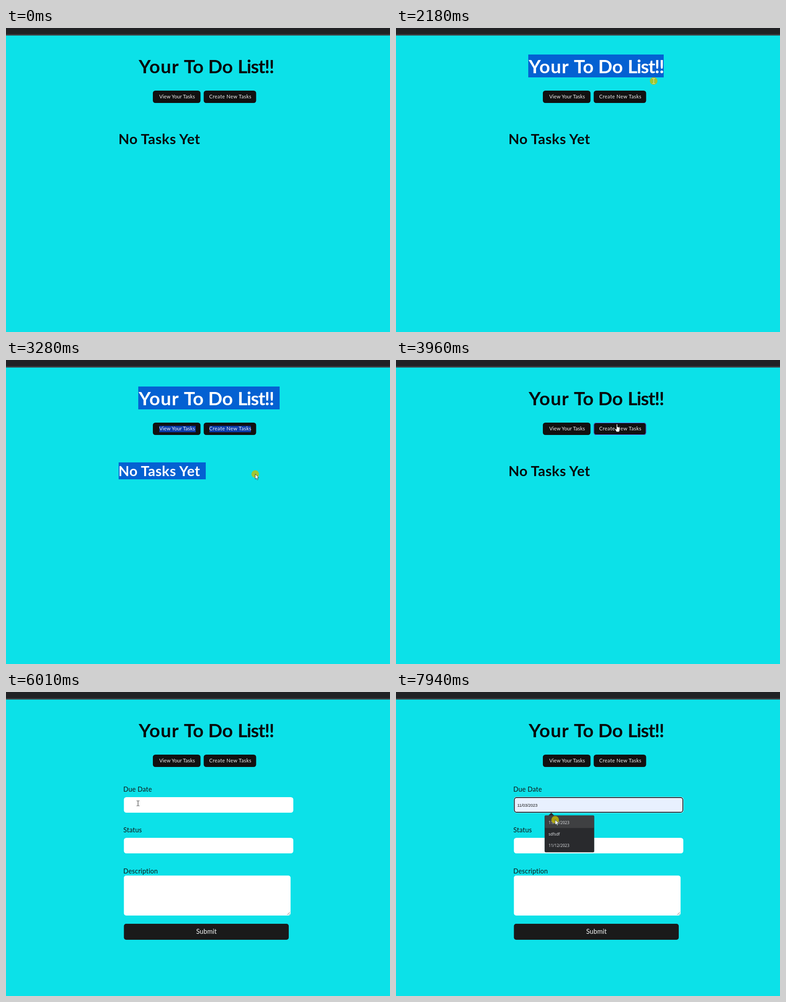
Recreate the animation shown at these times as an HTML page. Size 842x665 px, loop 8 s.

```html
<!DOCTYPE html>
<html lang="en">
<head>
<meta charset="utf-8">
<title>To do list</title>
<style>
  html, body { margin: 0; width: 100%; height: 100%; overflow: hidden; background: #0ce1e8; }
  svg { display: block; }
  text { font-family: Lato, "Open Sans", sans-serif; }
  .ui { font-family: "Open Sans", "Noto Sans", sans-serif; }
  .field { font-family: "Liberation Sans", Arial, sans-serif; }
</style>
</head>
<body>
<svg id="stage" width="842" height="665" viewBox="0 0 842 665"></svg>
<script>
const LOOP = 8000, STEP = 70;
const INK = '#080a0b', BLUE = '#0461d2', WHITE = '#fff';

// Areas that react to the pointer: x, y, width, height
const VIEW = [322, 137, 104.5, 27], NEW = [433.5, 137, 115, 27];
const FIELD = [258.5, 230, 371.5, 34], ROW = [326.5, 270, 107.5, 27.5];
const TITLE = [290, 58, 310, 60];

const text = (s, x, y, size, fill, more = '') =>
  `<text x="${x}" y="${y}" font-size="${size}" fill="${fill}" ${more}>${s}</text>`;
const box = ([x, y, w, h], r, fill, more = '') =>
  `<rect x="${x}" y="${y}" width="${w}" height="${h}" rx="${r}" fill="${fill}" ${more}/>`;
const group = (id, body) => `<g id="${id}">${body}</g>`;
const gap = n => `letter-spacing="${n}"`;

const heading = (s, x, y, size, fill, space) => text(s, x, y, size, fill, `font-weight="700" ${gap(space)}`);
const title = fill =>
  heading('Your', 291, 98.5, 41, fill, 1.2) +
  heading('To Do', 390, 98.5, 41, fill, 0) +
  heading('List!!', 508, 98.5, 41, fill, -1.5);
const empty = fill => heading('No Tasks Yet', 246.5, 253.5, 31, fill, 0.5);
const label = (s, y) => text(s, 257.3, y, 14.5, '#101516', gap(0.2));
const outline = (id, [x, y, w, h]) =>
  box([x + 0.5, y + 0.5, w - 1, h - 1], 5, 'none', `id="${id}" stroke="#646cff"`);

const form =
  label('Due Date', 218) + box(FIELD, 5.5, WHITE) +
  label('Status', 307) + box([258.5, 319, 371.5, 34], 5.5, WHITE) +
  label('Description', 396.5) + box([258.5, 401.5, 365.5, 87.5], 5, WHITE) +
  '<path d="M616.5 487.5l6-6M620 487.5l2.5-2.5" stroke="#666" stroke-width=".9"/>' +
  box([258.5, 507, 361.5, 35], 5, '#1a1a1a') + text('Submit', 417, 529, 14.5, '#f6f6f6', gap(0.1));

const options = ['11/03/2023', 'sdfsdf', '11/12/2023'];
const menu =
  '<path d="M334 270.5l6.5-6.5 6.5 6.5z" fill="#292a2d"/>' +
  box([326, 270, 108.5, 80.5], 2.5, '#292a2d', 'stroke="#17494d" stroke-opacity=".5" stroke-width=".8"') +
  box(ROW, 1.5, '#3f4042', 'id="row"') +
  options.map((s, i) => text(s, 334.5, 289 + i * 24.8, 8.6, '#e8eaed', 'class="ui"')).join('');

const pointer =
  '<circle id="press" r="8.3" fill="#c8be00" fill-opacity=".78"/>' +
  '<path id="arrow" d="M0 0V11.2L2.6 8.8 4.4 12.8 6.2 12 4.5 8.1H8Z" fill="#fff" stroke="#1b2a2c" stroke-width=".8"/>' +
  '<path id="beam" d="M-3-5.5H-1L0-4.8 1-5.5H3M0-4.8V4.8M-3 5.5H-1L0 4.8 1 5.5H3" fill="none"/>' +
  '<path id="hand" d="M-1.2 1.2a1.2 1.2 0 0 1 2.4 0V6l4 1q1.6.4 1.4 2.2L6 13q-.4 3-1.5 4H-1L-4.5 11.5Q-5 9.8-3.4 10L-1.2 11.5Z" fill="#fff" stroke="#111" stroke-width=".9"/>';

document.getElementById('stage').innerHTML =
  '<clipPath id="cut"><rect id="cutBox" x="290" y="58" height="50"/></clipPath>' +
  box([0, 0, 842, 665], 0, '#0ce1e8') + box([0, 0, 842, 14], 0, '#202124') +
  box([0, 13.5, 842, 3], 0, '#3d3e42') +
  title(INK) + `<g clip-path="url(#cut)">${box([290, 58, 310, 50], 0, BLUE) + title(WHITE)}</g>` +
  box(VIEW, 5.5, '#111') + box(NEW, 5.5, '#111') +
  outline('viewHover', VIEW) + outline('newHover', NEW) +
  box([336, 144, 80, 14], 0, '#0a3ca8', 'id="viewSel"') +
  box([446, 144, 91, 14], 0, '#0a3ca8', 'id="newSel"') +
  text('View Your Tasks', 336, 154, 11, '#f4f4f4', gap(0.1)) +
  text('Create New Tasks', 445.6, 154, 11, '#f4f4f4', gap(0.45)) +
  group('empty', empty(INK)) +
  group('emptySel', box([247, 224, 191, 37], 0, BLUE) + empty(WHITE)) +
  group('form', form) +
  group('focus',
    box([258.5, 229.5, 372, 35], 6, WHITE) +
    box([259.5, 230.8, 369.5, 32.4], 5, WHITE, 'id="fieldBox" stroke="#10131c" stroke-width="1.7"') + menu) +
  text(options[0], 266, 251, 9, '#111', 'id="value" class="field"') +
  box([266, 239, 1, 15], 0, '#111', 'id="caret"') +
  group('pointer', pointer);

// Each move: start, end, then the points passed at an even pace
const APPEAR = 570;
const moves = [
  [APPEAR, 1390, [783, 577], [484, 72], [412, 30], [280, 68]],
  [1890, 2170, [377, 104], [565, 116]],
  [2170, 2660, [540, 140], [536, 156]],
  [2660, 3080, [540, 195], [546.5, 249.5]],
  [3480, 3950, [531, 222], [512, 196], [478, 127]],
  [3980, 4200, [484.5, 154.5]],
  [5040, 5800, [416, 156], [438, 285], [300, 318], [294, 273]],
  [5800, 5950, [289.5, 243.5]],
  [7200, 7650, [349, 279.5]],
];

// Mouse button down and up
const presses = [[1890, 3080], [3280, 3480], [4310, 4570], [6340, 6480], [7940, LOOP]];
const [[DRAG, DROP], [, CLEAR], [, OPEN], [FOCUS]] = presses;

const el = {};
document.querySelectorAll('[id]').forEach(e => el[e.id] = e);
const show = (id, on) => { el[id].style.display = on ? '' : 'none'; };

function pointerAt(t) {
  const now = Math.floor(t / STEP) * STEP;
  let at = moves[0][2];
  for (const [from, to, ...stops] of moves) {
    if (now < from) break;
    const line = [at, ...stops];
    const k = Math.min(1, (now - from) / (to - from)) * stops.length;
    const i = Math.min(stops.length - 1, Math.floor(k));
    at = line[i].map((v, axis) => v + (line[i + 1][axis] - v) * (k - i));
  }
  return at;
}

function draw(t) {
  const [px, py] = pointerAt(t);
  const over = ([x, y, w, h]) => px >= x && px < x + w && py >= y && py < y + h;
  const dragging = t >= DRAG && t < DROP;
  const selecting = t >= DRAG && t < CLEAR;
  const open = t >= OPEN, focused = t >= FOCUS;
  const onView = over(VIEW), onNew = over(NEW);

  // Pointer shape follows what lies beneath it
  const onText = dragging ? over(TITLE) || onNew : open && over(FIELD);
  const kind = onText ? 'beam' : onView || onNew ? 'hand' : 'arrow';
  for (const id of ['arrow', 'beam', 'hand']) show(id, id === kind);
  show('pointer', t >= APPEAR);
  show('press', presses.some(([down, up]) => t >= down && t < up));
  el.pointer.setAttribute('transform', `translate(${px} ${py})`);
  el.beam.setAttribute('stroke', dragging ? '#eee9b0' : '#222');
  show('viewHover', onView);
  show('newHover', onNew);

  // Selection grows with the drag, line by line
  const reach = py > 118 ? 310 : Math.max(0, px - 290 + (py > 110 ? 22 : 0));
  el.cutBox.setAttribute('width', selecting ? reach : 0);
  show('viewSel', selecting && py > 118);
  show('newSel', selecting && py > 137);
  show('emptySel', selecting && py > 200);

  show('empty', !open);
  show('form', open);
  show('focus', focused);
  const preview = focused && over(ROW);
  show('row', preview);
  show('value', preview);
  el.fieldBox.setAttribute('fill', preview ? '#e8f0fe' : WHITE);
  show('caret', focused && (t - FOCUS) % 1040 < 540);
}

const start = performance.now();
function tick() {
  draw((performance.now() - start) % LOOP);
  requestAnimationFrame(tick);
}
tick();
</script>
</body>
</html>
```
